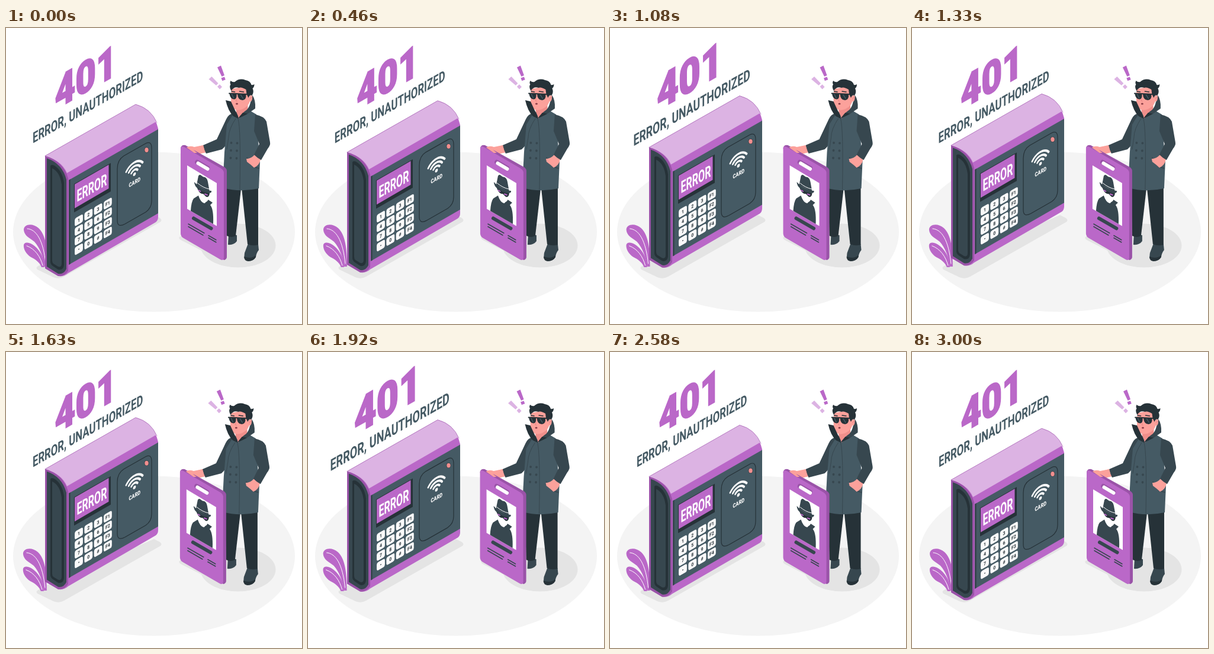
Animation, 500 px wide and 500 px high, one loop 3.04 s. Source, as an HTML page with a canvas:

```html
<!DOCTYPE html>
<html lang="en">
<head>
<meta charset="utf-8">
<title>401 Error, Unauthorized</title>
<style>
html, body { margin: 0; width: 100%; height: 100%; overflow: hidden; background: #fff; }
canvas { display: block; width: 500px; height: 500px; }
</style>
</head>
<body>
<canvas id="stage"></canvas>
<script>
const LOOP = 3040, CYCLE = 3000;
const PURPLE = '#ba68c8', LIGHT = '#dcb3e3', DEEP = '#9a53a8';
const INK = '#263238', SLATE = '#37474f', STEEL = '#455a64', SKIN = '#fca19b';
const FLOOR = '#f4f4f4', SHADE = '#e4e4e4', WHITE = '#fff', PALE = '#fafafa';

const canvas = document.getElementById('stage');
const dpr = window.devicePixelRatio || 1;
canvas.width = canvas.height = 500 * dpr;
const ctx = canvas.getContext('2d');

// ---- drawing helpers ----
function fill(d, color) {
  ctx.fillStyle = color;
  ctx.fill(new Path2D(d));
}

function line(d, color, width = 1, cap = 'round') {
  ctx.strokeStyle = color;
  ctx.lineWidth = width;
  ctx.lineCap = cap;
  ctx.lineJoin = 'round';
  ctx.stroke(new Path2D(d));
}

function oval(x, y, rx, ry, color, turn = 0) {
  ctx.fillStyle = color;
  ctx.beginPath();
  ctx.ellipse(x, y, rx, ry, turn, 0, 7);
  ctx.fill();
}

function group(x, y, draw) {
  ctx.save();
  ctx.translate(x, y);
  draw();
  ctx.restore();
}

// Plane rising to the right; k is the foreshortening along it.
function iso(x, y, k, draw) {
  ctx.save();
  ctx.transform(k, -0.572 * k, 0, 1, x, y);
  draw();
  ctx.restore();
}

function label(str, x, y, size, weight, color, k, outline = 0) {
  iso(x, y, k, () => {
    ctx.font = `${weight} ${size}px Roboto, Inter, sans-serif`;
    ctx.textAlign = 'left';
    ctx.fillStyle = ctx.strokeStyle = color;
    ctx.lineJoin = 'miter';
    ctx.lineWidth = outline;
    ctx.fillText(str, 0, 0);
    if (outline) ctx.strokeText(str, 0, 0);
  });
}

// ---- motion ----
function bezier(p, x1, y1, x2, y2) {
  const at = (u, a, b) => 3 * u * (1 - u) ** 2 * a + 3 * u * u * (1 - u) * b + u ** 3;
  let lo = 0, hi = 1;
  for (let i = 0; i < 20; i++) {
    const mid = (lo + hi) / 2;
    if (at(mid, x1, x2) < p) lo = mid; else hi = mid;
  }
  return at(lo, y1, y2);
}

const SHAKE = [0, -1, 2, -4, 4, -4, 4, -4, 2, -1, 0];
function shake(t) {
  const p = (t % 1500) / 150, i = Math.floor(p);
  const e = bezier(p - i, .25, .1, .25, 1);
  return 1.15 * (SHAKE[i] + (SHAKE[i + 1] - SHAKE[i]) * e);
}

const lift = t => -20 * (1 - Math.abs(t - 1500) / 1500);
const bump = (t, mid, half) => Math.max(0, 1 - Math.abs(t - mid) / half);
const beat = t => 1 + 0.1 * (bump(t, 900, 450) + bump(t, 1985, 345));

// ---- scene parts ----
function floor() {
  oval(250, 344.5, 238, 135, FLOOR);
  oval(392, 367.5, 63.5, 37, SHADE);
  fill('M293 353L300 349L374 388L372 394L360 391L295 358Q291 355 293 353Z', SHADE);
  fill('M53 403L66 395L250 316L260 321Q265 325 260 328L98 420Q89 425 80 421L53 408Q50 405 53 403Z', SHADE);
}

function title(s) {
  ctx.save();
  ctx.translate(138.5, 114);
  ctx.scale(s, s);
  ctx.translate(-138.5, -114);
  label('401', 82.5, 138.5, 75, 900, PURPLE, .8, 2);
  label('ERROR, UNAUTHORIZED', 45, 195, 25, 600, STEEL, .67);
  ctx.restore();
}

function leaves() {
  fill('M29 341C29 331 44 329 54 338C66 349 69 372 69 403L64 403C62 386 56 371 47 361C38 354 30 351 29 341Z', PURPLE);
  line('M35 339C50 340 62 358 66 398', WHITE, 1);
  fill('M29 366C31 360 40 362 47 368C58 377 64 390 64 404L59 404C55 395 49 391 41 387C33 382 28 373 29 366Z', PURPLE);
  line('M34 368C48 373 57 386 61 401', WHITE, 1);
}

function keypad() {
  const keys = ['1', '2', '3', 'F1', '4', '5', '6', 'F2', '7', '8', '9', 'F3', '•', '0', '#', 'F4'];
  keys.forEach((key, i) => {
    const col = i % 4, row = i >> 2;
    iso(123 + col * 16.3, 324.7 + row * 16.3 - col * 9.4, .866, () => {
      ctx.fillStyle = PALE;
      ctx.beginPath();
      ctx.roundRect(-8, -6.8, 16, 13.6, 3.2);
      ctx.fill();
      ctx.font = '700 8px Roboto, Inter, sans-serif';
      ctx.textAlign = 'center';
      ctx.fillStyle = INK;
      ctx.fillText(key, 0, 2.9);
    });
  });
}

function signal() {
  iso(217, 247, .866, () => {
    ctx.strokeStyle = PALE;
    ctx.lineWidth = 3.6;
    ctx.lineCap = 'round';
    for (const r of [7.5, 13.7, 20]) {
      ctx.beginPath();
      ctx.arc(0, 0, r, -2.5, -.64);
      ctx.stroke();
    }
    oval(0, 0, 2.8, 2.8, PALE);
  });
}

function device() {
  // shell
  fill('M66 216L219 129Q249 137 257 170V319Q257 325 253 328L105 414Q97 421 88 419L66 406Z', PURPLE);
  fill('M66 216L219 129Q243 135 254 158L103 245Q94 224 66 216Z', LIGHT);
  line('M66 216L219 129Q245 136 255 160', DEEP, .6);
  // front
  fill('M106 257L257 171V313L106 400Z', STEEL);
  fill('M106 257L109 255.3V398.3L106 400Z', SLATE);
  // side
  fill('M66 216Q97 225 105 254V410Q99 420 88 419L66 406Z', DEEP);
  fill('M69 220Q95 229 102 256V407Q97 417 88 415L69 403Z', SLATE);
  fill('M75 233Q76 230 81 232Q95 240 98 262V400Q97 410 88 408L79 402Q75 399 75 395Z', INK);
  fill('M78 237Q91 243 94 264V398Q94 405 88 403L80 398Q78 396 78 393Z', SLATE);
  // screen
  fill('M115 263.5L177 228V276L115 311.5Z', INK);
  fill('M116 264L173.5 231V271L116 304.5Z', PURPLE);
  label('ERROR', 119.5, 294, 28, 600, WHITE, .575);
  keypad();
  // reader
  line('M188 238Q188 223 199 216L236 195Q246 190 246 203V292Q246 304 236 311L201 331Q188 338 188 325Z', INK, 1.2);
  oval(237.5, 206, 3.7, 4.4, INK);
  oval(237.5, 206, 3.2, 3.9, '#f28f8f');
  signal();
  label('CARD', 207.5, 269.5, 10, 800, PALE, .74);
}

function marks() {
  fill('M357 66.5L363 63.5L369 80L364.5 82Z', PURPLE);
  fill('M363.5 84.5L369 82.5L370.8 87.3L365.3 89.3Z', PURPLE);
  fill('M342.5 86.5L347.5 82L358.5 93.5L355 97Z', LIGHT);
  fill('M357 99L361 95.2L365 99.6L361 103.6Z', LIGHT);
}

function head() {
  fill('M387 130L406 120L406 140L391 153L386 140Z', '#f08f8b');
  fill('M378 103L405 98L410 121Q408 131 402 134Q394 140 386 138Q378 137 377.5 128Z', SKIN);
  oval(410.5, 119, 4.4, 5.4, SKIN, .3);
  line('M409.5 120Q411 116 413.5 117', '#e27f7f', .8);
  // hair
  fill('M378 106Q374 100 377 95Q375 93 377 89Q380 92 384 91Q392 84 402 88Q410 89 412 96Q414 97 417 95Q417 100 414 102Q417 108 413 114Q409 112 407 118L404 112L403 104Q395 99 391 101Q383 98 378 106Z', INK);
  line('M378.5 107L384 108M392 107L399 108', INK, 1.5);
  // glasses
  line('M374.5 110.5L407 112', INK, 1.8);
  fill('M375 110.5L387 111Q388 120 383 120.5Q376 120 375 110.5Z', INK);
  fill('M388.5 111L403 111.5Q404 121.5 397 122Q389 122 388.5 111Z', INK);
  line('M379 112L382 118M394 113L398 119', STEEL, 1.4);
  line('M387 120L385.5 123L388 123.5', '#e27f7f', .8);
  oval(387.5, 128, 2, 1.5, '#8c3f48');
}

function man() {
  // legs and shoes
  fill('M374 348L388 350V360Q383 367 373 366Z', SLATE);
  fill('M407 364L401 380Q399 391 405 393Q415 395 420 387Q421 380 425 375L424 365Z', SLATE);
  fill('M400 386Q400 393 407 394Q416 394 420 387L420 384Q412 391 400 386Z', INK);
  fill('M369 268L371 351Q379 355 386 351L395 272Z', INK);
  fill('M396 270L406 365Q415 369 424 366V268Z', INK);
  // far arm and hand
  fill('M304 203Q307 199 315 202L332 198L336 210L324 213Q317 214 313 210Z', SKIN);
  fill('M384 143Q374 145 370 154L354 188L331 198Q333 206 336 212L363 205Q371 199 379 178Z', SLATE);
  // coat
  fill('M384 142L371 163L367 210L364 270Q394 278 425 271L427 226L424 190L421 146L409 139Z', STEEL);
  line('M386 153Q374 171 374 185L371 205', SLATE, 1);
  line('M390 153Q395 170 393 273', SLATE, 1);
  for (let row = 0; row < 3; row++) {
    oval(378.5 - row * .5, 194 + row * 12.8, 1.9, 2.1, SLATE);
    oval(388.5 - row * .5, 194.5 + row * 12.8, 1.9, 2.1, SLATE);
  }
  // near arm and hand
  line('M405 219L415 234L425 237', SLATE, 1.5);
  fill('M404 221Q412 221 418 214L428 222Q426 232 417 236Q412 231 405 226Z', SKIN);
  fill('M419 146Q434 149 438 158L444 193Q445 198 440 204L429 223Q423 220 417 214L426 196L417 174Z', SLATE);
  group(.5, 0, head);
  // collar
  fill('M369 122L378 124L384 137L390 149V153L382 149Q373 140 369 122Z', INK);
  fill('M411 125Q415 122 414 113Q420 122 419 136L406 145L390 153Q396 144 405 138Q410 132 411 125Z', SLATE);
  fill('M390 153L398 143L406 145Z', INK);
}

function spy() {
  ctx.save();
  ctx.clip(new Path2D('M307 232L357 262V334.5L307 305.5Z'));
  fill('M313 309Q314 293 318 288L326 283L328 288Q332 296 337 296L341 289L350 295L346 299Q352 306 351 331L330 325Z', SLATE);
  fill('M325 272L344 281Q344 293 337 295Q326 290 325 272Z', WHITE);
  fill('M323 268L345 279Q344 287 339 285L334 280Q328 282 323 268Z', INK);
  line('M326.5 274L329.5 276M337 280.5L341 282', PURPLE, 2);
  fill('M323 265L326 250Q328 246 332 250Q334 252 337 252Q341 254 342 260L345 277Z', SLATE);
  fill('M319 260Q324 266 334 271Q342 275 348 275Q349 279 343 279Q334 278 326 272Q319 267 319 260Z', SLATE);
  line('M324.5 262Q334 270 344 272', WHITE, 1);
  ctx.restore();
}

function card() {
  fill('M296 203Q297 197 304 198L370 235Q374 238 374 241V387Q374 390 370 392L364 390Z', DEEP);
  fill('M296 204Q296 198 302 201L364 237Q369 240 369 245V387Q369 394 363 391L301 355Q296 352 296 347Z', PURPLE);
  line('M324 226.5L341.5 236.5', DEEP, 7.5);
  line('M325.5 228.5L341.5 238', WHITE, 6);
  fill('M307 232L357 262V334.5L307 305.5Z', WHITE);
  spy();
  line('M318 321.5L347.5 338.5', SLATE, 6);
  line('M309 331L336 346.5M309 335.5L334 350M343 350.5L356 358M343 354.5L356 362', SLATE, 1.5);
}

function render(t) {
  const sway = shake(t);
  ctx.setTransform(dpr, 0, 0, dpr, 0, 0);
  ctx.fillStyle = WHITE;
  ctx.fillRect(0, 0, 500, 500);
  floor();
  title(beat(t));
  group(sway + 1, 0, leaves);
  group(0, lift(t), device);
  group(sway, 0, () => {
    marks();
    group(2, 0, man);
    group(-1, 0, card);
    // fingers over the card edge
    fill('M305 202Q310 198 318 201L333 198L335 206Q324 208 317 206L323 211L318 211Z', SKIN);
  });
}

const start = performance.now();
function tick() {
  const t = (performance.now() - start) % LOOP;
  render(Math.min(t, CYCLE));
  requestAnimationFrame(tick);
}
tick();
</script>
</body>
</html>
```
